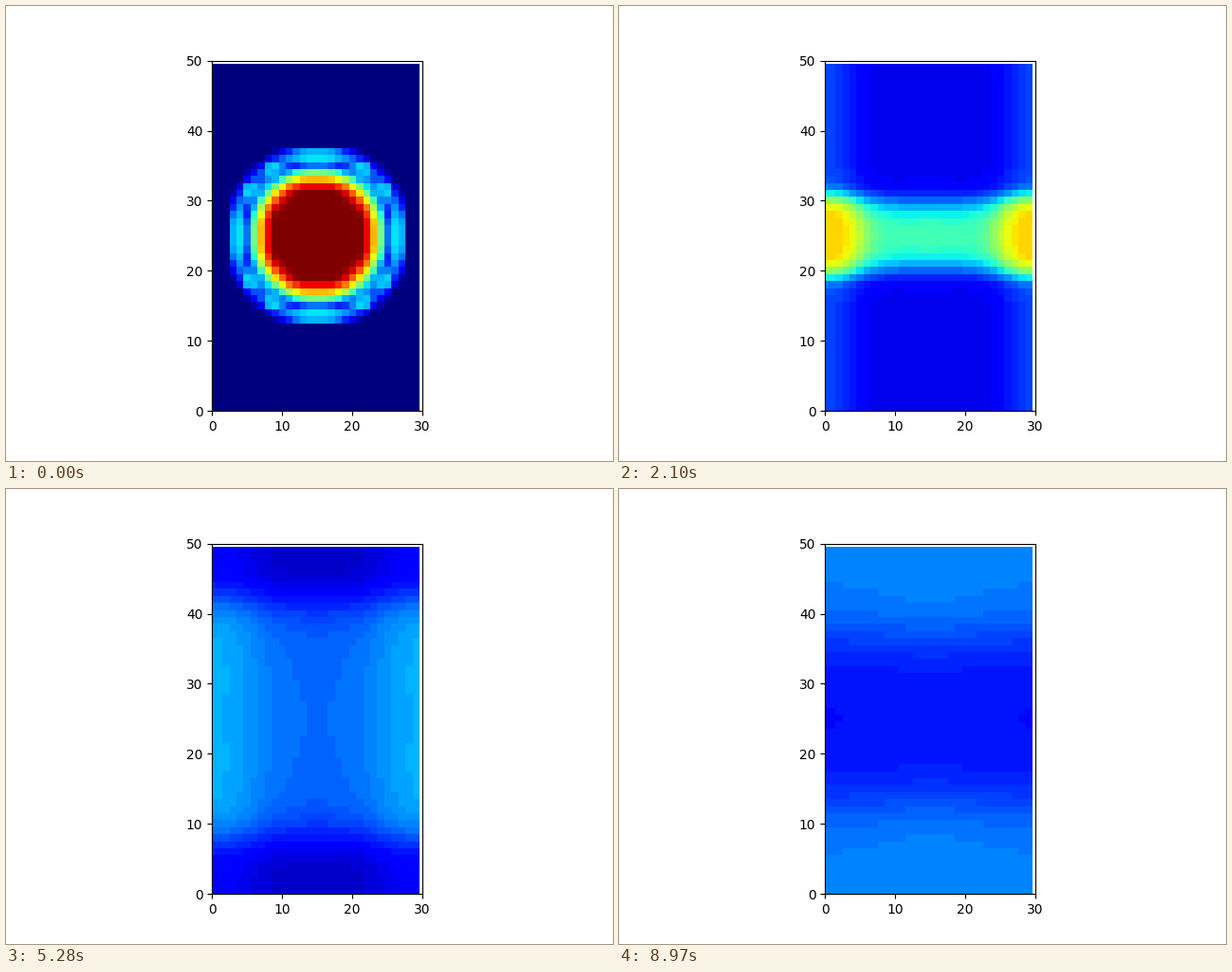
Write a matplotlib script that moves like this. It is 640 px wide and 480 px high and loops after 9 s.

```python
import numpy as np
import matplotlib.pyplot as plt
from matplotlib.animation import FuncAnimation

W, H = 30, 50
FRAMES, INTERVAL = 300, 30
LOW, HIGH, RADIUS = 0.2, 1.0, 10
OMEGA = 1.0

# D2Q9 lattice: directions and weights
DIRS = [(cx, cy) for cx in (-1, 0, 1) for cy in (-1, 0, 1)]
WEIGHTS = [(4 / 9, 1 / 9, 1 / 36)[abs(cx) + abs(cy)] for cx, cy in DIRS]


def stream(f):
    return np.array([np.roll(p, (cy, cx), axis=(0, 1))
                     for p, (cx, cy) in zip(f, DIRS)])


def collide(f):
    rho = f.sum(axis=0)
    ux = sum(cx * p for p, (cx, _) in zip(f, DIRS)) / rho
    uy = sum(cy * p for p, (_, cy) in zip(f, DIRS)) / rho
    usq = 1.5 * (ux**2 + uy**2)
    eq = []
    for w, (cx, cy) in zip(WEIGHTS, DIRS):
        cu = 3 * (cx * ux + cy * uy)
        eq.append(w * rho * (1 + cu + cu**2 / 2 - usq))
    return f + OMEGA * (np.array(eq) - f)


def simulate():
    y, x = np.mgrid[:H, :W]
    disc = (x - W / 2)**2 + (y - H / 2)**2 < RADIUS**2
    f = np.repeat(np.where(disc, HIGH, LOW)[None] / 9, 9, axis=0)
    f = stream(f)
    for _ in range(2):
        f = stream(collide(f))
    fields = []
    for _ in range(FRAMES):
        fields.append(f.sum(axis=0))
        f = stream(collide(f))
    return fields


fields = simulate()

fig, ax = plt.subplots(figsize=(6.4, 4.8), dpi=100)
image = ax.imshow(fields[0], cmap=plt.get_cmap("jet", 64), vmin=LOW, vmax=HIGH,
                  origin="lower", interpolation="nearest")
ax.set_xlim(0, W)
ax.set_ylim(0, H)
ax.set_xticks(range(0, W + 1, 10))
ax.set_yticks(range(0, H + 1, 10))


def update(i):
    image.set_data(fields[i])
    return [image]


anim = FuncAnimation(fig, update, frames=FRAMES, interval=INTERVAL,
                     repeat=True, repeat_delay=0, blit=False)
plt.show()
```
